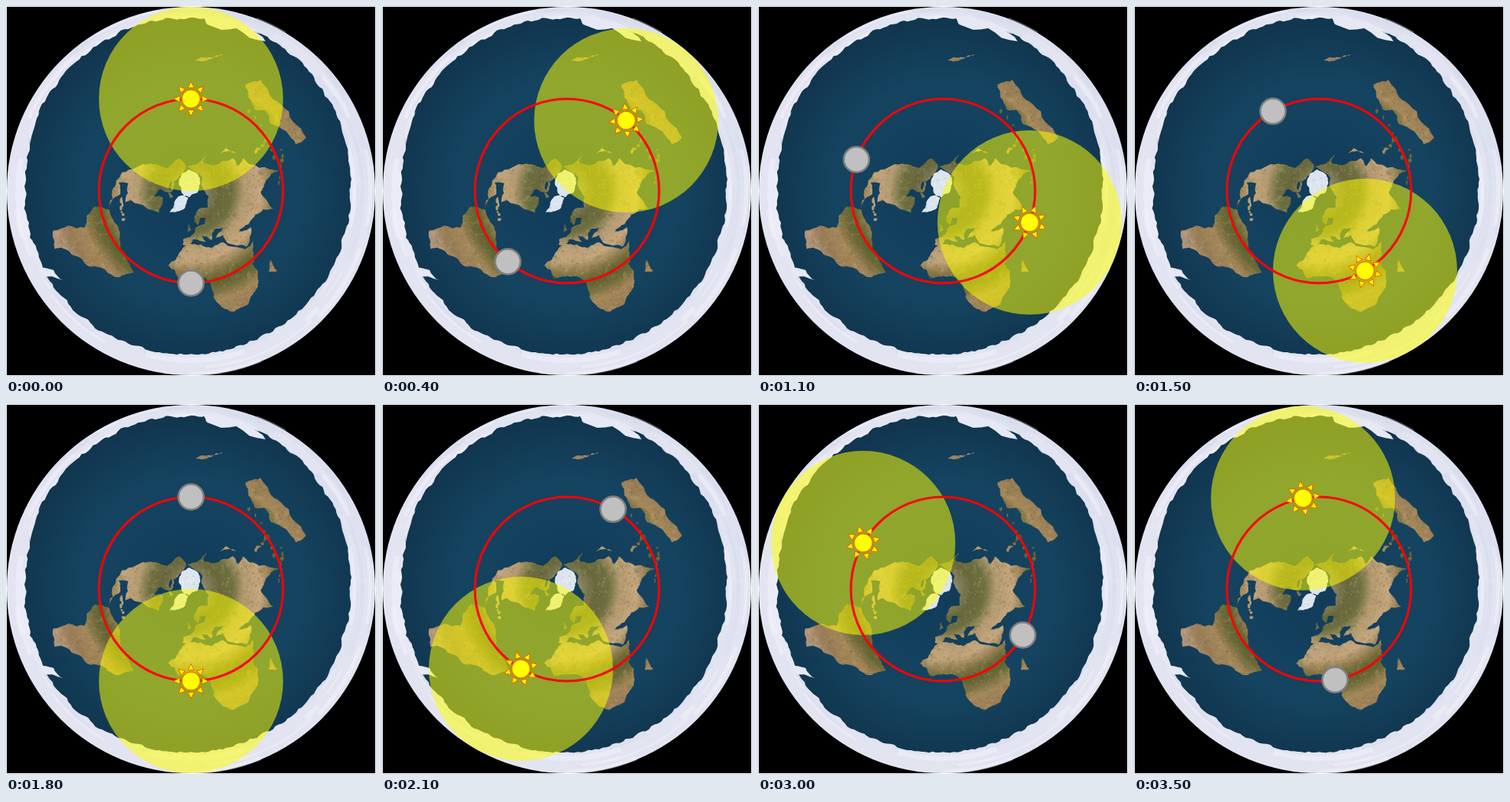
Animation, 482 px wide and 482 px high, one loop 3600 ms. Source, as an HTML page with a canvas:

```html
<!DOCTYPE html>
<html lang="en">
<head>
<meta charset="utf-8">
<title>Sun and moon circling a disc map</title>
<style>
html, body { margin: 0; width: 100%; height: 100%; overflow: hidden; background: #fff; }
canvas { display: block; }
</style>
</head>
<body>
<canvas id="stage" width="482" height="482"></canvas>
<script>
const SIZE = 482, MID = 241, ORBIT = 120, TAU = Math.PI * 2;
const STEP = 100, STEPS = 36;

// Key coast points as longitude, latitude; the bays between them are random
const LANDS = {
  africa: [-6,36, 10,37, 20,31, 32,31, 43,12, 51,12, 40,-3, 40,-12, 35,-24, 27,-34, 19,-35, 12,-16, 9,4,
    -8,4, -17,14, -10,30],
  madagascar: [49,-12, 47,-25, 44,-20],
  eurasia: [-9,37, -9,43, -1,45, 8,54, 21,55, 28,60, 18,62, 12,56, 6,60, 25,71, 45,67, 72,72, 104,78, 140,73,
    190,66, 163,60, 157,51, 156,60, 136,54, 128,38, 118,38, 122,30, 109,20, 105,9, 103,2, 98,16, 89,22, 78,8,
    70,23, 50,29, 59,22, 45,13, 35,28, 36,37, 27,38, 41,42, 31,46, 23,38, 13,45, 16,38, 3,43, -2,37],
  britain: [-5,50, 1,52, -4,58],
  japan: [130,32, 141,36, 143,44, 138,38],
  australia: [142,-11, 153,-27, 148,-38, 134,-32, 115,-34, 114,-22, 130,-12, 138,-17],
  newZealand: [167,-47, 172,-42, 178,-38, 172,-40],
  northAmerica: [-168,66, -156,71, -115,68, -85,69, -94,60, -82,54, -77,62, -65,59, -56,52, -70,43, -81,31,
    -80,25, -97,28, -97,19, -88,21, -83,10, -78,8, -105,20, -124,42, -135,58, -160,56],
  southAmerica: [-77,8, -62,10, -50,1, -35,-7, -40,-20, -53,-33, -65,-45, -67,-55, -74,-50, -71,-20, -81,-5]
};
const GREENLAND = [-45,60, -55,70, -65,80, -25,83, -20,72];
// Island chains: from longitude, latitude to longitude, latitude
const CHAINS = [[96,4, 116,-8], [112,2, 148,-8], [121,17, 125,-4], [-118,71, -68,70], [-84,22, -66,18]];
// Land colour depends on latitude
const CLIMATE = { 78: "#8d8866", 62: "#69683d", 50: "#6c6f40", 38: "#b39a70", 22: "#c5a67e", 10: "#8c7a4a",
  0: "#59622f", "-8": "#6f6a3a", "-20": "#a5885a", "-34": "#987c55", "-50": "#b0937a" };

const ctx = document.getElementById("stage").getContext("2d");
const map = document.createElement("canvas");
map.width = map.height = SIZE;

let seed = 7;
const rand = () => (seed = seed * 16807 % 2147483647) / 2147483647;
const spread = size => (rand() - 0.5) * size;

// Polar equidistant projection, north pole in the middle
const reach = lat => (90 - lat) * 4 / 3;
function project(lon, lat) {
  const a = lon * TAU / 360;
  return [MID + reach(lat) * Math.sin(a), MID + reach(lat) * Math.cos(a)];
}

// Line with randomly displaced midpoints
function roughLine(path, [ax, ay], [bx, by], depth) {
  if (!depth) return path.lineTo(bx, by);
  const bend = spread(0.26);
  const mid = [(ax + bx) / 2 + (by - ay) * bend, (ay + by) / 2 - (bx - ax) * bend];
  roughLine(path, [ax, ay], mid, depth - 1);
  roughLine(path, mid, [bx, by], depth - 1);
}

function addShape(path, points, depth = 3) {
  path.moveTo(...points[0]);
  points.forEach((p, i) => roughLine(path, p, points[(i + 1) % points.length], depth));
  path.closePath();
  return path;
}

function coast(list) {
  const points = [];
  for (let i = 0; i < list.length; i += 2) points.push(project(list[i], list[i + 1]));
  return points;
}

function ring(x, y, rx, ry, count, bulge = 0) {
  return Array.from({ length: count }, (_, i) => {
    const a = i / count * TAU, k = 1 + bulge * Math.sin(2 * a) ** 2;
    return [x + rx * k * Math.cos(a), y + ry * k * Math.sin(a)];
  });
}

function addChain(path, [lon, lat, lon2, lat2]) {
  for (let t = 0; t <= 1; t += 0.15) {
    const [x, y] = project(lon + (lon2 - lon) * t, lat + (lat2 - lat) * t);
    addShape(path, ring(x + spread(3), y + spread(3), 1 + rand() * 2, 1 + rand() * 3, 5), 1);
  }
}

function disc(c, x, y, r, fill, stroke, width) {
  c.beginPath();
  c.arc(x, y, r, 0, TAU);
  if (fill) { c.fillStyle = fill; c.fill(); }
  if (stroke) { c.strokeStyle = stroke; c.lineWidth = width; c.stroke(); }
}

function speckle(c, count, size, alpha, colors) {
  c.globalAlpha = alpha;
  for (let i = 0; i < count; i++) {
    c.beginPath();
    c.ellipse(rand() * SIZE, rand() * SIZE, 0.5 + rand() * size, 0.5 + rand() * size / 2, rand() * TAU, 0, TAU);
    c.fillStyle = colors[i % colors.length];
    c.fill();
  }
  c.globalAlpha = 1;
}

function drawIce(c) {
  disc(c, MID, MID, 240, "#e2e4f1");
  for (let i = 0; i < 70; i++) {
    const a = rand() * TAU;
    c.beginPath();
    c.arc(MID, MID, 212 + rand() * 27, a, a + 0.1 + rand() * 0.5);
    c.strokeStyle = i % 2 ? "#f5f6fc66" : "#d3d7ea55";
    c.lineWidth = 2 + rand() * 5;
    c.stroke();
  }
}

function drawOcean(c) {
  const g = c.createRadialGradient(MID, MID, 20, MID, MID, 222);
  g.addColorStop(0, "#113c5a");
  g.addColorStop(0.6, "#154461");
  g.addColorStop(1, "#11364f");
  c.fillStyle = g;
  c.fill(addShape(new Path2D(), ring(236.5, 235, 212.5, 219, 72, 0.012), 2));

  // Ice spurs reaching into the sea
  c.fillStyle = "#e6e8f4";
  c.fill(addShape(new Path2D(), [[22, 288], [41, 322], [48, 341], [62, 344], [74, 357], [46, 350]], 2));
  c.fill(addShape(new Path2D(), [[258, 14], [262, 24], [300, 29], [338, 46], [320, 28]], 2));
  c.fill(addShape(new Path2D(), [[22, 205], [31, 180], [46, 135], [34, 150]], 2));
}

function drawLand(c) {
  const land = new Path2D();
  Object.values(LANDS).forEach(list => addShape(land, coast(list)));
  CHAINS.forEach(chain => addChain(land, chain));

  const g = c.createRadialGradient(MID, MID, 0, MID, MID, 200);
  for (const lat in CLIMATE) g.addColorStop(reach(lat) / 200, CLIMATE[lat]);
  c.fillStyle = g;
  c.fill(land);
  c.save();
  c.clip(land);
  speckle(c, 2500, 6, 0.14, ["#4b5a26", "#d8bd98", "#7d6640", "#b39468"]);
  speckle(c, 12000, 1.2, 0.2, ["#3f4a20", "#dcc6a4", "#6b5636"]);
  c.restore();
}

function drawPolarIce(c) {
  const ice = addShape(new Path2D(), coast(GREENLAND));
  addShape(ice, ring(239, 231, 14, 18, 8));
  c.fillStyle = "#dce4ee";
  c.fill(ice);
  c.save();
  c.clip(ice);
  speckle(c, 5000, 1.5, 0.35, ["#ffffff", "#ffffff", "#9fb6c8"]);
  c.restore();
}

function drawMap() {
  const c = map.getContext("2d");
  c.fillStyle = "#fff";
  c.fillRect(0, 0, SIZE, SIZE);
  c.fillStyle = "#000";
  c.fillRect(1, 1, SIZE - 2, SIZE - 2);
  drawIce(c);
  drawOcean(c);
  drawLand(c);
  drawPolarIce(c);
}

function drawSun(x, y, angle) {
  ctx.save();
  ctx.translate(x, y);
  ctx.rotate(angle);
  ctx.fillStyle = "#ff0";
  ctx.strokeStyle = "#f06400";
  ctx.lineWidth = 1;
  for (let i = 0; i < 8; i++) {
    ctx.beginPath();
    ctx.moveTo(-4, -14.5);
    ctx.lineTo(0, -22.5);
    ctx.lineTo(4, -14.5);
    ctx.closePath();
    ctx.fill();
    ctx.stroke();
    ctx.rotate(TAU / 8);
  }
  disc(ctx, 0, 0, 12, "#ff0", "#e07800", 1.5);
  ctx.restore();
}

function draw(now) {
  const angle = Math.floor(now / STEP) % STEPS / STEPS * TAU;
  const dx = ORBIT * Math.sin(angle), dy = -ORBIT * Math.cos(angle);
  ctx.drawImage(map, 0, 0);
  disc(ctx, MID + dx, MID + dy, 120, "rgba(255,255,0,.53)");
  disc(ctx, MID, MID, ORBIT, null, "#f00", 3);
  disc(ctx, MID - dx, MID - dy, 16.5, "#c0c0c0", "#808080", 2.5);
  drawSun(MID + dx, MID + dy, angle);
}

drawMap();
const start = performance.now();
function tick() {
  draw(performance.now() - start);
  requestAnimationFrame(tick);
}
tick();
</script>
</body>
</html>
```
